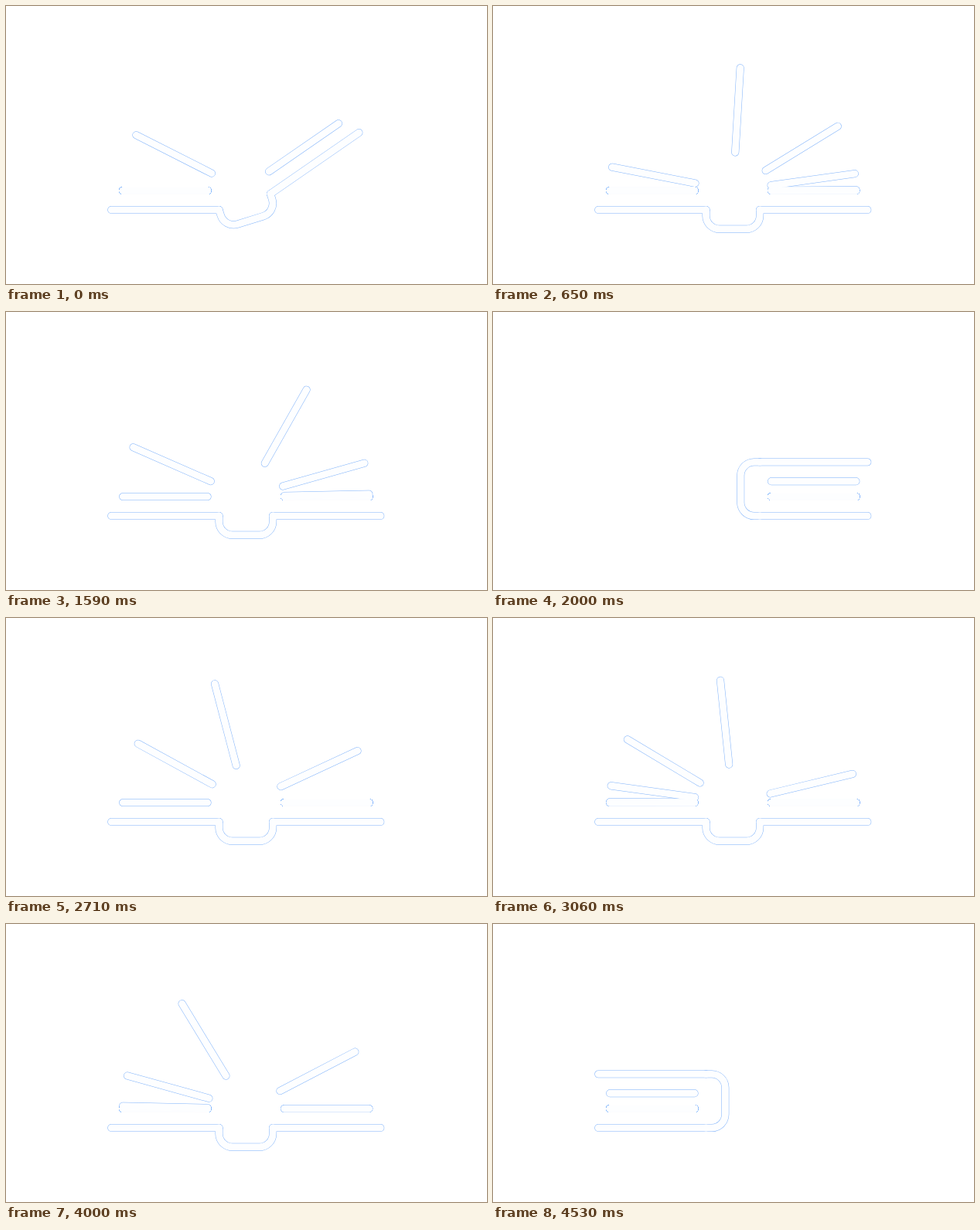
Recreate the animation shown at these times as an HTML page. Size 622 by 360 pixels, loop 5.76 s.

```html
<!DOCTYPE html>
<html lang="en">
<head>
<meta charset="utf-8">
<title>Book loader</title>
<style>
html, body { margin: 0; width: 100%; height: 100%; overflow: hidden; background: #fff; }
svg { display: block; width: 100%; height: 100%; }
#book { fill: none; stroke-linecap: round; }
</style>
</head>
<body>
<svg viewBox="0 0 622 360">
  <defs>
    <g id="book">
      <g id="inner">
        <path d="M2 2V5a7 7 0 0 0 7 7H23a7 7 0 0 0 7-7V2"/>
        <path id="left" d="M-54 2H2M-48-8H-4"/>
        <path id="right" d="M30 2H86M36-8H80"/>
      </g>
      <g id="pages"></g>
    </g>
  </defs>
  <g transform="translate(270.52 259) scale(2.486)">
    <use href="#book" stroke="#7fb2fa" stroke-width="4"/>
    <use href="#book" stroke="#fdfeff" stroke-width="3.6"/>
  </g>
</svg>
<script>
const LOOP = 5760, FPS = 17, PAGES = 18;
const $ = id => document.getElementById(id);
const inner = $('inner'), left = $('left'), right = $('right');

const pages = Array.from({ length: PAGES }, () => {
  const page = document.createElementNS('http://www.w3.org/2000/svg', 'path');
  page.setAttribute('d', 'M-48-8H-4');
  return $('pages').appendChild(page);
});

// CSS "ease": cubic-bezier(.25, .1, .25, 1)
function ease(x) {
  if (x <= 0) return 0;
  if (x >= 1) return 1;
  let lo = 0, hi = 1;
  for (let n = 0; n < 24; n++) {
    const u = (lo + hi) / 2;
    if (0.75 * u * (1 - u) + u ** 3 < x) lo = u; else hi = u;
  }
  const v = 1 - lo;
  return 0.3 * lo * v * v + 3 * lo * lo * v + lo ** 3;
}

const ramp = (p, from, to) => ease((p - from) / (to - from));
const spin = (el, angle, x, y) =>
  el.setAttribute('transform', `rotate(${angle.toFixed(3)} ${x} ${y})`);

// p is the progress of the cycle in percent
function draw(p) {
  const flipped = ramp(p, 40, 46) - ramp(p, 54, 60);
  const shut = 1 - ramp(p, 4, 10) + ramp(p, 90, 96);
  const onRight = p > 40 && p < 60;
  const fold = 90 * (flipped + shut);

  spin(inner, onRight ? fold : -fold, onRight ? 30 : 2, 2);
  spin(left, fold, 2, 2);
  spin(right, -fold, 30, 2);

  pages.forEach((page, n) => {
    const start = 1.86 * (n + 1), end = 1.74 * (n + 1);
    const turn = ramp(p, 4 + start, 13 + end) - ramp(p, 54 + start, 63 + end);
    spin(page, 180 * turn, 16, -8);
  });
}

function tick() {
  const t = performance.now() % LOOP;
  const step = Math.floor(t * FPS / 1000 + 0.085);
  draw(Math.min(100, Math.max(7.03, 6.55 + 20 * step / FPS)));
  requestAnimationFrame(tick);
}
tick();
</script>
</body>
</html>
```
